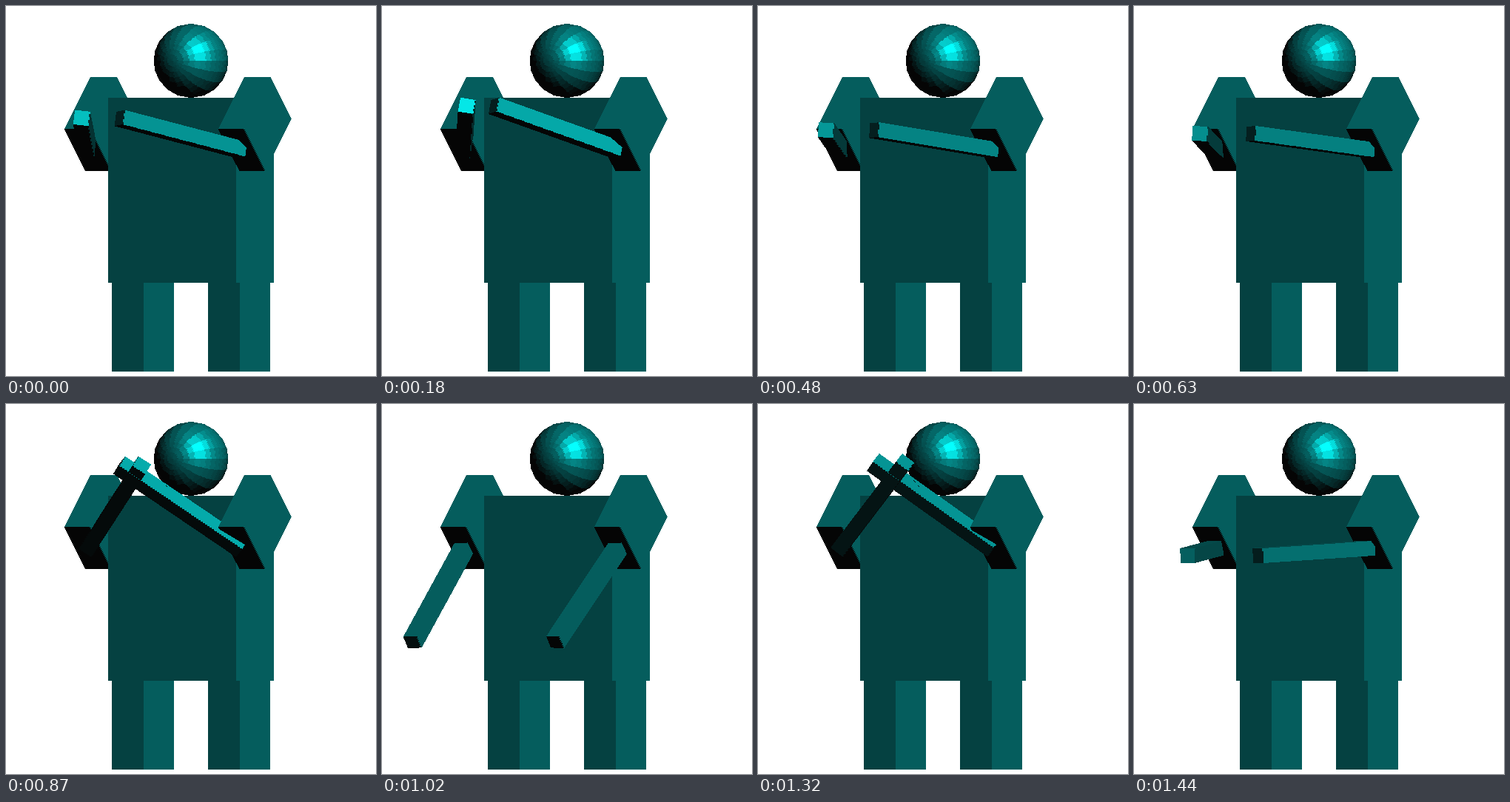
Animation of 500 by 500 pixels, one loop 1500 ms. Source, as an HTML page with a canvas:

```html
<!DOCTYPE html>
<html lang="en">
<head>
<meta charset="utf-8">
<title>Swinging arms</title>
<style>
  html, body { margin: 0; width: 100%; height: 100%; overflow: hidden; background: #fff; }
  canvas { display: block; width: 500px; height: 500px; }
</style>
</head>
<body>
<canvas id="stage" width="500" height="500"></canvas>
<script>
const SIZE = 500, CX = 250, CY = 249;
const LOOP = 1500, STEP = 30, LAST = 48;
const RAD = Math.PI / 180;
const TURN = 30 * RAD;
const LIGHT = [0.373, 0.52, 0.77];
const HALF = [0.21, 0.29, 0.934];

const ctx = document.getElementById('stage').getContext('2d');
const image = ctx.createImageData(SIZE, SIZE);
const pixels = new Uint32Array(image.data.buffer);
const depth = new Float32Array(SIZE * SIZE);

const dot = (a, b) => a[0] * b[0] + a[1] * b[1] + a[2] * b[2];
const sub = (a, b) => [a[0] - b[0], a[1] - b[1], a[2] - b[2]];
const cross = (a, b) => [
  a[1] * b[2] - a[2] * b[1],
  a[2] * b[0] - a[0] * b[2],
  a[0] * b[1] - a[1] * b[0]
];

// y points up, z towards the viewer
const view = ([x, y, z]) => [
  x * Math.cos(TURN) - z * Math.sin(TURN),
  y,
  x * Math.sin(TURN) + z * Math.cos(TURN)
];
// A positive angle swings a hanging limb forward.
const rotX = ([x, y, z], a) => [
  x,
  y * Math.cos(a) + z * Math.sin(a),
  z * Math.cos(a) - y * Math.sin(a)
];
const rotZ = ([x, y, z], a) => [
  x * Math.cos(a) - y * Math.sin(a),
  x * Math.sin(a) + y * Math.cos(a),
  z
];
const move = (p, x, y, z = 0) => [p[0] + x, p[1] + y, p[2] + z];

function shade(n) {
  const diffuse = dot(n, LIGHT);
  let v = 5;
  if (diffuse > 0) v += 124 * diffuse + 165 * Math.max(0, dot(n, HALF)) ** 20;
  v = Math.min(255, Math.round(v));
  return (255 << 24 | v << 16 | v << 8 | 5) >>> 0;
}

// Fills a flat convex face with a depth test; row ends include every touched pixel.
function face(points, center) {
  const p = points.map(view);
  let n = cross(sub(p[2], p[0]), sub(p[3], p[1]));
  const len = Math.hypot(...n) * (dot(n, sub(p[0], view(center))) < 0 ? -1 : 1);
  n = n.map(c => c / len);
  if (n[2] < 1e-4) return;
  const color = shade(n);
  const ys = p.map(q => CY - q[1]);
  const top = Math.max(0, Math.ceil(Math.min(...ys) - 0.5));
  const end = Math.min(SIZE, Math.ceil(Math.max(...ys) - 0.5));
  for (let row = top; row < end; row++) {
    const y = CY - row - 0.5;
    let lo = Infinity, hi = -Infinity;
    p.forEach((a, i) => {
      const b = p[(i + 1) % p.length];
      if ((a[1] > y) === (b[1] > y)) return;
      const x = a[0] + (b[0] - a[0]) * (y - a[1]) / (b[1] - a[1]);
      lo = Math.min(lo, x);
      hi = Math.max(hi, x);
    });
    const from = Math.max(0, Math.floor(CX + lo));
    const to = Math.min(SIZE, Math.ceil(CX + hi));
    for (let col = from; col < to; col++) {
      const x = col + 0.5 - CX;
      const z = p[0][2] - (n[0] * (x - p[0][0]) + n[1] * (y - p[0][1])) / n[2];
      const k = row * SIZE + col;
      if (z > depth[k]) {
        depth[k] = z;
        pixels[k] = color;
      }
    }
  }
}

function box(w, h, d, place) {
  const half = [w / 2, h / 2, d / 2];
  const center = place([0, 0, 0]);
  for (let axis = 0; axis < 3; axis++) {
    for (const side of [-1, 1]) {
      const corners = [[-1, -1], [1, -1], [1, 1], [-1, 1]].map(([a, b]) => {
        const q = [];
        q[axis] = side * half[axis];
        q[(axis + 1) % 3] = a * half[(axis + 1) % 3];
        q[(axis + 2) % 3] = b * half[(axis + 2) % 3];
        return place(q);
      });
      face(corners, center);
    }
  }
}

function ball(r, y, slices, stacks) {
  const at = (i, j) => {
    const u = 2 * Math.PI * i / slices, v = Math.PI * j / stacks;
    return [r * Math.sin(v) * Math.cos(u), y + r * Math.sin(v) * Math.sin(u), r * Math.cos(v)];
  };
  for (let i = 0; i < slices; i++)
    for (let j = 0; j < stacks; j++)
      face([at(i, j), at(i + 1, j), at(i + 1, j + 1), at(i, j + 1)], [0, y, 0]);
}

// Shoulder space: the upper arm hangs along -y, tilted forward.
const shoulder = (p, side) => move(rotX(p, 45 * RAD), side * 120, 125);

function forearm(side, swing) {
  box(20, 200, 20, p => {
    p = rotZ(move(p, 0, -100), -side * 50 * RAD * swing);
    p = rotX(p, 110 * RAD * swing);
    return shoulder(move(p, 0, -100), side);
  });
}

pixels.fill(0xffffffff);
depth.fill(-1e6);
ball(50, 175, 20, 20);
box(200, 250, 100, p => p);
for (const side of [-1, 1]) {
  box(50, 120, 80, p => move(p, side * 75, -185));
  box(40, 100, 80, p => shoulder(move(p, 0, -50), side));
}
const basePixels = pixels.slice();
const baseDepth = depth.slice();

let shown = -1;
function draw() {
  const tick = Math.min(LAST, Math.floor(performance.now() % LOOP / STEP));
  if (tick !== shown) {
    shown = tick;
    pixels.set(basePixels);
    depth.set(baseDepth);
    const swing = Math.abs(Math.sin(12 + 0.2 * tick));
    forearm(-1, swing);
    forearm(1, swing);
    ctx.putImageData(image, 0, 0);
  }
  requestAnimationFrame(draw);
}
draw();
</script>
</body>
</html>
```
